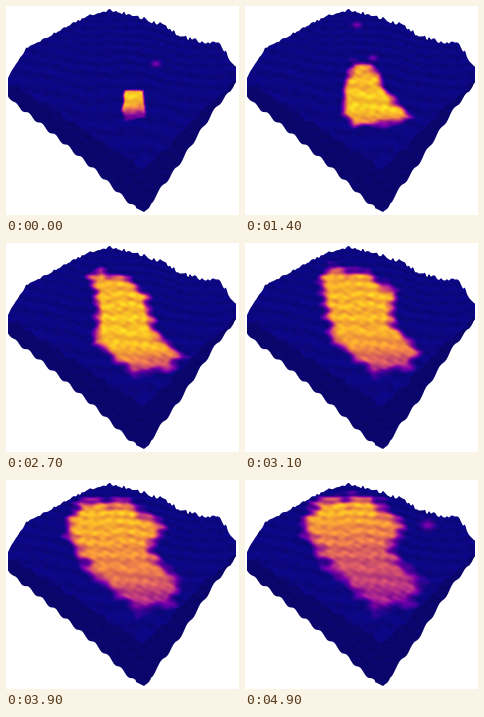
Recreate the animation shown at these times as a matplotlib script. Size 233x209 px, loop 5000 ms.

```python
import numpy as np
import matplotlib.pyplot as plt
from matplotlib.animation import FuncAnimation

W, H, DPI = 233, 209, 64
FRAMES, INTERVAL = 50, 100
rng = np.random.default_rng(12)
x, y = np.meshgrid(np.arange(W) + 0.5, np.arange(H) + 0.5)
cols = x[0]


def waves(n, low, high):
    """Smooth noise made of plane waves with wavelengths low..high."""
    total = np.zeros_like(x)
    for _ in range(n):
        angle, phase = rng.uniform(0, 2 * np.pi, 2)
        k = 2 * np.pi / rng.uniform(low, high)
        total += np.sin(k * (x * np.cos(angle) + 1.5 * y * np.sin(angle)) + phase)
    return total / np.sqrt(n)


def edge(points):
    px, py = np.array(points).T
    return np.interp(cols, px, py)


def below(curve):
    slope = np.sqrt(1 + np.gradient(curve) ** 2)
    return np.clip((y - curve) / slope + 0.5, 0, 1)


def smooth(v):
    v = np.clip(v, 0, 1)
    return v * v * (3 - 2 * v)


# Terrain block: skyline, rim of the walls and underside
knots = np.arange(0, W + 2, 2)
spikes = np.interp(cols, knots, rng.uniform(-2.5, 1.5, len(knots)))
skyline = edge([(2, 72), (5, 66), (20, 43), (40, 32), (62, 20), (85, 9), (105, 4),
                (120, 8), (135, 12), (155, 19), (172, 29), (188, 35), (205, 37),
                (216, 41), (224, 54), (229, 61)])
skyline = skyline + spikes * np.interp(cols, [0, 20, 80, 120, 180], [0, 0.5, 0.6, 1, 1.3])
rim = edge([(2, 77), (40, 99), (70, 119), (100, 139), (138, 163),
            (160, 142), (190, 111), (215, 88), (229, 76)])
rim = rim + 1.5 * np.sin(cols / 2.3) + np.sin(cols / 4.1)
under = edge([(2, 89), (8, 97), (30, 114), (60, 139), (90, 165), (118, 192), (130, 202),
              (138, 206), (143, 202), (150, 189), (172, 160), (190, 132),
              (212, 99), (224, 86), (229, 76)])
under = under + 1.6 * np.sin(cols / 2.1) * (np.abs(cols - 138) > 8)

block = below(skyline) * (1 - below(under)) * (x > 2) * (x < 230)
wall = below(rim)

# Ripples get closer together towards the back
depth = np.clip(5 + 0.1 * (y - 0.12 * (x - 110) + 3 * np.sin(x / 17)), 1, None)
ripple = np.sin(20 * np.pi * np.log(depth) + 0.5 * waves(5, 30, 60))
grain = waves(14, 7, 18)
blur = waves(8, 14, 35)
top_shade = 0.96 + 0.05 * ripple + 0.035 * grain
wall_shade = 0.8 + 0.03 * waves(8, 6, 16)
shade = (top_shade * (1 - wall) + wall_shade * wall)[..., None]

# Key poses of the hot area
TIMES = [0, 1400, 2100, 2700, 3500, 4300, 4900]
OUTLINES = np.array([
    [(117, 82), (124, 82), (133, 83), (138, 84), (139, 92),
     (141, 100), (141, 113), (118, 116), (114, 105), (116, 92)],
    [(105, 52), (112, 52), (126, 56), (138, 66), (142, 80),
     (172, 113), (150, 122), (108, 124), (93, 110), (96, 80)],
    [(90, 30), (98, 27), (115, 38), (144, 56), (148, 82),
     (183, 108), (150, 126), (118, 130), (90, 102), (97, 65)],
    [(78, 30), (95, 22), (125, 32), (145, 48), (153, 85),
     (185, 114), (165, 132), (125, 137), (84, 102), (86, 60)],
    [(60, 38), (72, 16), (123, 16), (168, 45), (152, 70),
     (180, 102), (172, 126), (130, 138), (82, 100), (60, 58)],
    [(52, 40), (70, 15), (125, 14), (165, 46), (152, 70),
     (184, 100), (172, 130), (132, 140), (80, 98), (52, 55)],
    [(52, 38), (70, 13), (128, 10), (168, 44), (155, 70),
     (186, 102), (174, 128), (128, 139), (78, 92), (52, 52)]], float)
HEAT_Y = [15, 45, 75, 98, 110, 132]
HEAT = np.array([[.85, .85, .88, .88, .28, .15],
                 [.80, .82, .85, .90, .86, .35],
                 [.75, .85, .88, .88, .85, .38],
                 [.75, .85, .88, .87, .82, .42],
                 [.82, .84, .80, .73, .58, .32],
                 [.92, .82, .68, .59, .48, .30],
                 [.93, .75, .58, .50, .43, .28]])
SOFTNESS = np.array([4, 10, 12, 13, 14, 18, 18.0])
# Small embers: x, y, radius, time of the peak, duration
EMBERS = [(150, 58, 4, 0, 900), (112, 19, 4, 1400, 700), (128, 52, 4, 1300, 600),
          (116, 20, 4, 2100, 500), (183, 45, 6, 4900, 900)]


def pose(keys, t):
    i = min(np.searchsorted(TIMES, t, side="right") - 1, len(TIMES) - 2)
    f = (t - TIMES[i]) / (TIMES[i + 1] - TIMES[i])
    return keys[i] * (1 - f) + keys[i + 1] * f


def inner_distance(points):
    """Signed distance to a polygon, positive inside."""
    dist = np.full_like(x, 1e9)
    inside = np.zeros(x.shape, bool)
    for (ax, ay), (bx, by) in zip(points, np.roll(points, -1, axis=0)):
        dx, dy = bx - ax, by - ay
        s = np.clip(((x - ax) * dx + (y - ay) * dy) / (dx * dx + dy * dy + 1e-9), 0, 1)
        dist = np.minimum(dist, np.hypot(x - ax - s * dx, y - ay - s * dy))
        if dy:
            inside ^= ((ay > y) != (by > y)) & (x < ax + dx * (y - ay) / dy)
    return np.where(inside, dist, -dist)


def render(t):
    soft = pose(SOFTNESS, t)
    reach = inner_distance(pose(OUTLINES, t)) + 0.12 * soft * (blur + 0.6 * ripple)
    heat = np.interp(y + 0.1 * (x - 120), HEAT_Y, pose(HEAT, t))
    heat = heat + 0.025 * grain + 0.03 * ripple
    value = smooth(reach / soft) * heat
    for ex, ey, r, peak, span in EMBERS:
        strength = 0.25 * max(0, 1 - abs(t - peak) / span)
        value = value + strength * np.exp(-((x - ex) ** 2 + 2 * (y - ey) ** 2) / r ** 2)
    value = np.clip(value * (1 - wall), 0, 0.97)
    rgb = plt.cm.plasma(value)[..., :3]
    lit = shade + (1 - shade) * 0.6 * value[..., None]
    cover = block[..., None]
    return np.clip(rgb * lit * cover + 1 - cover, 0, 1)


fig = plt.figure(figsize=(W / DPI, H / DPI), dpi=DPI, facecolor="white")
ax = fig.add_axes([0, 0, 1, 1])
ax.axis("off")
picture = ax.imshow(render(0), interpolation="nearest", aspect="auto")


def update(frame):
    picture.set_data(render(frame * INTERVAL))
    return [picture]


anim = FuncAnimation(fig, update, frames=FRAMES, interval=INTERVAL,
                     repeat=True, repeat_delay=0)
plt.show()
```
